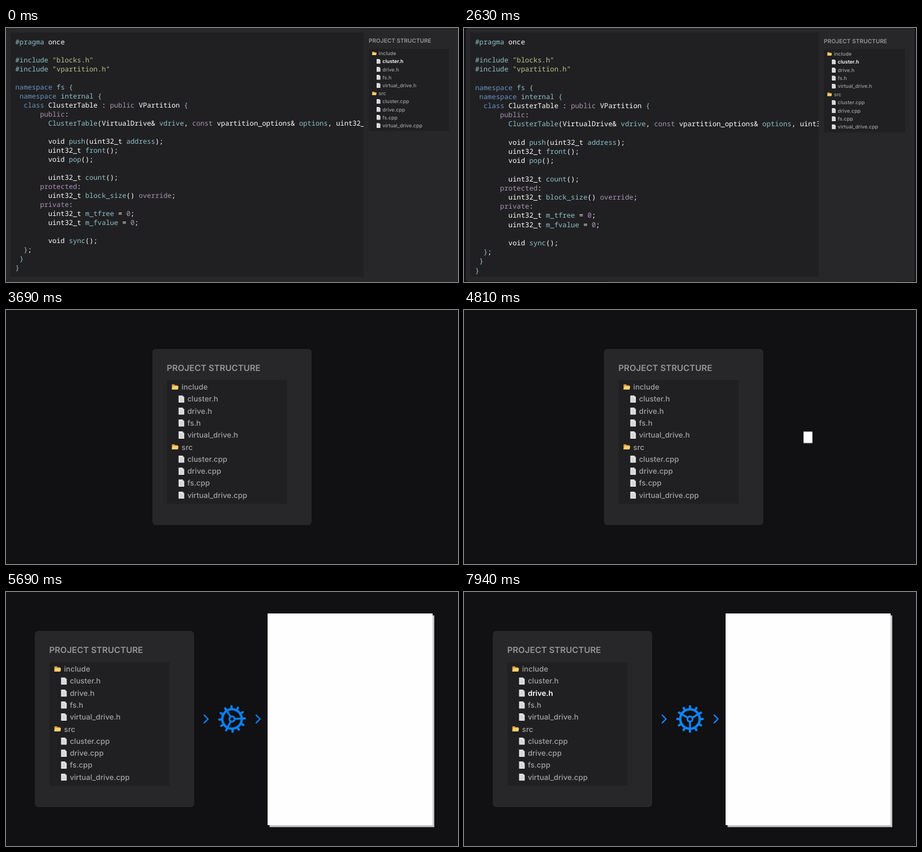
Recreate the animation shown at these times as an HTML page. Size 800x450 px, loop 8 s.

```html
<!DOCTYPE html>
<html lang="en">
<head>
<meta charset="utf-8">
<title>Project to document</title>
<style>
  html, body { margin: 0; width: 100%; height: 100%; overflow: hidden; background: #111012; }
  #stage {
    position: relative; width: 800px; height: 450px; overflow: hidden;
    display: grid; place-items: center; background: #111012;
    text-rendering: geometricPrecision;
  }
  #stage, #stage * { box-sizing: border-box; }
  .loop { animation-duration: 8s; animation-iteration-count: infinite; }

  /* laid out four times larger, so that small text keeps exact positions */
  .fine { transform: scale(.25); transform-origin: 0 0; }

  /* window */
  #card {
    position: relative; overflow: hidden; border-radius: 4px;
    background: #272628; animation-name: card;
  }
  @keyframes card {
    0%, 32.44% { width: 800px; height: 450px; scale: 1; translate: 0; }
    43.31%, 59.38% { width: 188px; height: 208px; scale: 1.5; translate: 0; }
    70.25%, 100% { width: 188px; height: 208px; scale: 1.5; translate: -208px; }
  }

  #panel {
    position: absolute; overflow: hidden; background: #202022; border-radius: 2px;
    animation-name: shrink, dim;
  }
  @keyframes shrink {
    0%, 32.44% { left: 8px; top: 8px; bottom: 9px; width: 625px; }
    43.31%, 100% { left: 0; top: 0; bottom: 0; width: 9px; }
  }
  @keyframes dim {
    0%, 33.25% { opacity: 1; }
    44.13%, 100% { opacity: 0; }
  }
  #code {
    margin: 0; padding: 8.5px 0 0 8.6px; color: #fff; white-space: pre;
    font: 12.13px/16px "Noto Sans Mono", "DejaVu Sans Mono", monospace;
  }
  .name { color: #8fbfc6; }
  .decl { color: #6890c2; }
  .word { color: #ab92b3; }
  .text { color: #b9c28c; }
  .brace { color: #9cc3bd; }

  /* file tree */
  #side {
    position: absolute; top: 0; width: 568px; color: #a2a1a3;
    font-family: Inter, "Open Sans", sans-serif; white-space: nowrap;
    animation-name: slide;
  }
  @keyframes slide {
    0%, 32.44% { left: 642px; }
    43.31%, 100% { left: 17px; }
  }
  #side h1 {
    position: absolute; top: 59px; margin: 0; color: #979698;
    font-size: 40px; line-height: 64px; font-weight: 600; letter-spacing: .2px;
  }
  #tree {
    position: absolute; top: 147px; width: 568px; height: 584px; padding-top: 5px;
    background: #202022; border-radius: 4px;
    font-size: 35.2px; line-height: 56.8px; letter-spacing: .1px; font-weight: 500;
  }
  .row { position: relative; height: 56.8px; padding-left: 70px; }
  .row.file { padding-left: 97px; }
  .row svg { position: absolute; left: 21.6px; top: 12.5px; width: 34.4px; height: 29.6px; }
  .row.file svg { left: 53.5px; top: 10px; width: 30.4px; height: 35.2px; }
  #pick1 { animation-name: pick1; }
  #pick2 { animation-name: pick2; }
  @keyframes pick1 {
    0%, 32.44% { color: #fff; font-weight: 600; }
    43.31%, 71% { color: #a2a1a3; font-weight: 500; }
    79%, 89.1% { color: #fff; font-weight: 600; }
    98%, 100% { color: #a2a1a3; font-weight: 500; }
  }
  @keyframes pick2 {
    0%, 89.1% { color: #a2a1a3; font-weight: 500; }
    98%, 100% { color: #fff; font-weight: 600; }
  }

  /* converter */
  #tool { position: absolute; inset: 0; animation-name: show; }
  @keyframes show {
    0%, 62.25% { opacity: 0; }
    73.12%, 100% { opacity: 1; }
  }
  #tool svg { position: absolute; fill: none; stroke: #0d85fb; stroke-linecap: round; stroke-linejoin: round; }
  #gear { left: 375px; top: 200px; width: 50px; height: 50px; animation-name: spin; animation-timing-function: linear; }
  @keyframes spin {
    from { rotate: -750.3deg; }
    to { rotate: 5.7deg; }
  }
  .arrow { top: 215px; width: 20px; height: 20px; stroke-width: 2.4; }

  /* printed page */
  #page {
    position: absolute; left: 462.5px; top: 37.5px; width: 291.5px; height: 375px;
    background: #fefdff; box-shadow: 3.5px 3.5px 0 #c8c7ca; animation-name: grow;
  }
  @keyframes grow {
    0%, 59.38% { scale: 0; }
    70.25%, 100% { scale: 1; }
  }
  #print { position: absolute; left: 0; top: 0; width: 400%; height: 400%; color: #000; animation-name: print; }
  @keyframes print {
    0%, 71% { opacity: 0; }
    81%, 88.3% { opacity: 1; }
    98%, 100% { opacity: 0; }
  }
  #print > * { position: absolute; margin: 0; white-space: pre; }
  #print pre { font: 12.6px/14.6px "Liberation Mono", monospace; tab-size: 72px; }
  #print h2 { font: 26.4px/32px "Liberation Serif", serif; }
</style>
</head>
<body>
<svg width="0" height="0" style="position:absolute">
  <symbol id="folder" viewBox="0 0 17 14">
    <path d="M1 13V2q0-1 1-1h5l2 2h6v10z" fill="#d9a03c"/>
    <path d="M1 13 3 5h14l-2 8z" fill="#ffd06e"/>
  </symbol>
  <symbol id="file" viewBox="0 0 15 17">
    <path d="M1 0h9l4 4v13H1z" fill="#e9e8ea"/>
    <path d="M10 0v4h4z" fill="#aaa9ac"/>
    <path d="M3.5 4.5H8M3.5 7.5h8M3.5 10.5h8M3.5 13.5h8" stroke="#b2b1b4"/>
  </symbol>
</svg>

<div id="stage">
  <div id="tool" class="loop">
    <svg class="arrow" style="left:344px" viewBox="-10 -10 20 20"><path d="M-3.2-6.8 3.6 0-3.2 6.8"/></svg>
    <svg id="gear" class="loop" viewBox="-25 -25 50 50">
      <circle r="17.2" stroke-width="4.2"/>
      <circle r="4.6" stroke-width="3.2"/>
    </svg>
    <svg class="arrow" style="left:436px" viewBox="-10 -10 20 20"><path d="M-3.2-6.8 3.6 0-3.2 6.8"/></svg>
  </div>

  <div id="page" class="loop"><div id="print" class="loop fine"></div></div>

  <div id="card" class="loop">
    <div id="panel" class="loop"><pre id="code">#pragma once

#include "blocks.h"
#include "vpartition.h"

namespace fs {
 namespace internal {
  class ClusterTable : public VPartition {
      public:
        ClusterTable(VirtualDrive&amp; vdrive, const vpartition_options&amp; options, uint32_t size);

        void push(uint32_t address);
        uint32_t front();
        void pop();

        uint32_t count();
      protected:
        uint32_t block_size() override;
      private:
        uint32_t m_tfree = 0;
        uint32_t m_fvalue = 0;

        void sync();
  };
 }
}</pre></div>
    <div id="side" class="loop fine">
      <h1>PROJECT STRUCTURE</h1>
      <div id="tree"></div>
    </div>
  </div>
</div>

<script>
const $ = id => document.getElementById(id);

// Syntax colours
const kinds = [
  [/^"/, 'text'],
  [/^(namespace|class)$/, 'decl'],
  [/^(public|protected|private|const|override|0)$/, 'word'],
  [/^[{}]/, 'brace'],
  [/^(once|void|uint32_t|VPartition|VirtualDrive|vpartition_options)$/, ''],
  [/^[#\w]/, 'name'],
];
const code = $('code');
const tokens = code.textContent.match(/"[^"]*"|class \w+|#?\w+|[{}]|[^\w"{}#]+/g);
code.textContent = '';
function paint(text, kind) {
  const span = document.createElement('span');
  span.className = kind;
  span.textContent = text;
  code.append(span);
}
for (const token of tokens) {
  if (token.startsWith('class ')) {
    paint('class', 'decl');
    paint(token.slice(5), '');
  } else {
    const kind = kinds.find(([test]) => test.test(token));
    paint(token, kind ? kind[1] : '');
  }
}

// File tree
const names = ['cluster', 'drive', 'fs', 'virtual_drive'];
const row = (icon, label, id = '') =>
  `<div class="row ${icon} loop" id="${id}"><svg><use href="#${icon}"/></svg>${label}</div>`;
$('tree').innerHTML =
  row('folder', 'include') +
  names.map((n, i) => row('file', n + '.h', i < 2 ? 'pick' + (i + 1) : '')).join('') +
  row('folder', 'src') +
  names.map(n => row('file', n + '.cpp')).join('');

// Gear teeth and spokes
function spoke(angle, from, to, width) {
  const line = document.createElementNS('http://www.w3.org/2000/svg', 'path');
  line.setAttribute('d', `M${from} 0H${to}`);
  line.setAttribute('stroke-width', width);
  line.setAttribute('transform', `rotate(${angle})`);
  $('gear').append(line);
}
for (let i = 0; i < 12; i++) spoke(i * 30, 18, 22.5, 4.2);
for (let i = 0; i < 3; i++) spoke(90 + i * 120, 6, 16, 3.4);

// Printed listing
const fn = (head, ...body) => [head, '{', ...body.map(s => '\t' + s), '}', ''];
const getter = (name, expr, args = '') => fn(`bool FileAttr::${name}(${args}) const`, `return ${expr};`);
const setter = (name, bit, args = '') =>
  fn(`FileAttr& FileAttr::${name}(${args}bool value)`, `set(${bit}, value);`, 'return *this;');
const index = 'uint32_t index';
const offset = 'uint32_t offset = 2 + 3 * (2 - who);';
const using = ['using namespace fs;', 'using namespace fs::internal;', ''];
const flags = ['suid', 'sgid', 'sticky'];
const roles = ['owner', 'group', 'world'];
const bit = name => 'BIT_' + name.toUpperCase();
const bits = ['directory', 'deleted', ...flags, ...roles.flatMap(r => [r + '_r', r + '_w', r + '_x'])];
const bitNo = i => i < 2 ? 15 - i : 13 - i;

const left = [
  '#include "attr.h"', '#include "bit_util.h"', '', ...using,
  ...bits.map((b, i) => `#define ${bit(b)}`.padEnd(23) + bitNo(i)), '',
  'FileAttr::FileAttr(const uint32_t raw) : m_raw(raw) {}', '',
  'FileAttr::FileAttr() : FileAttr(0)', '{', '}', '',
  ...getter('is_dir', 'is_set(BIT_DIRECTORY)'),
  ...getter('is_file', '!is_dir()'),
  ...getter('deleted', 'is_set(BIT_DELETED)'),
  ...flags.flatMap(f => getter(f, `is_set(${bit(f)})`)),
  ...roles.flatMap(r => getter(r, `is_set(${bit(r)}_R - index)`, index)),
  ...fn('bool FileAttr::can(uint32_t who, uint32_t what) const', offset, 'return is_set(offset - what);'),
  ...setter('is_dir', 'BIT_DIRECTORY'),
];
const right = [
  ...fn('FileAttr& FileAttr::is_file(bool value)', 'return is_dir(!value);'),
  ...['deleted', ...flags].flatMap(f => setter(f, bit(f))),
  ...roles.flatMap(r => setter(r, bit(r) + '_R - index', index + ', ')),
  ...fn('FileAttr& FileAttr::set(uint32_t who, uint32_t what, bool\nvalue)',
    offset, 'set(offset - what, value);', 'return *this;'),
  ...fn('const uint32_t FileAttr::value() const', 'return m_raw;'),
  ...fn('bool FileAttr::is_set(uint32_t index) const', 'return binary_is_set(m_raw, index);'),
  ...fn('void FileAttr::set(uint32_t index, bool value)', 'binary_toggle(m_raw, index, value);'),
];
const catalog = [
  '#include "catalog.h"', '', '#include <vector>', '', ...using,
  'catalog_record to_catalog_record(catalog_entry& entry) {',
  '\treturn catalog_record{', '\t\tentry,', '\t\tfalse', '\t};',
];
function put(tag, x, y, text) {
  const el = document.createElement(tag);
  el.style.left = x + 'px';
  el.style.top = y + 'px';
  el.textContent = text;
  $('print').append(el);
}
put('h2', 166, 102, 'Файл attr.cpp');
put('pre', 166, 160, left.join('\n'));
put('pre', 674, 101, right.join('\n'));
put('h2', 674, 1126, 'Файл catalog.cpp');
put('pre', 674, 1187, catalog.join('\n'));
</script>
</body>
</html>
```
